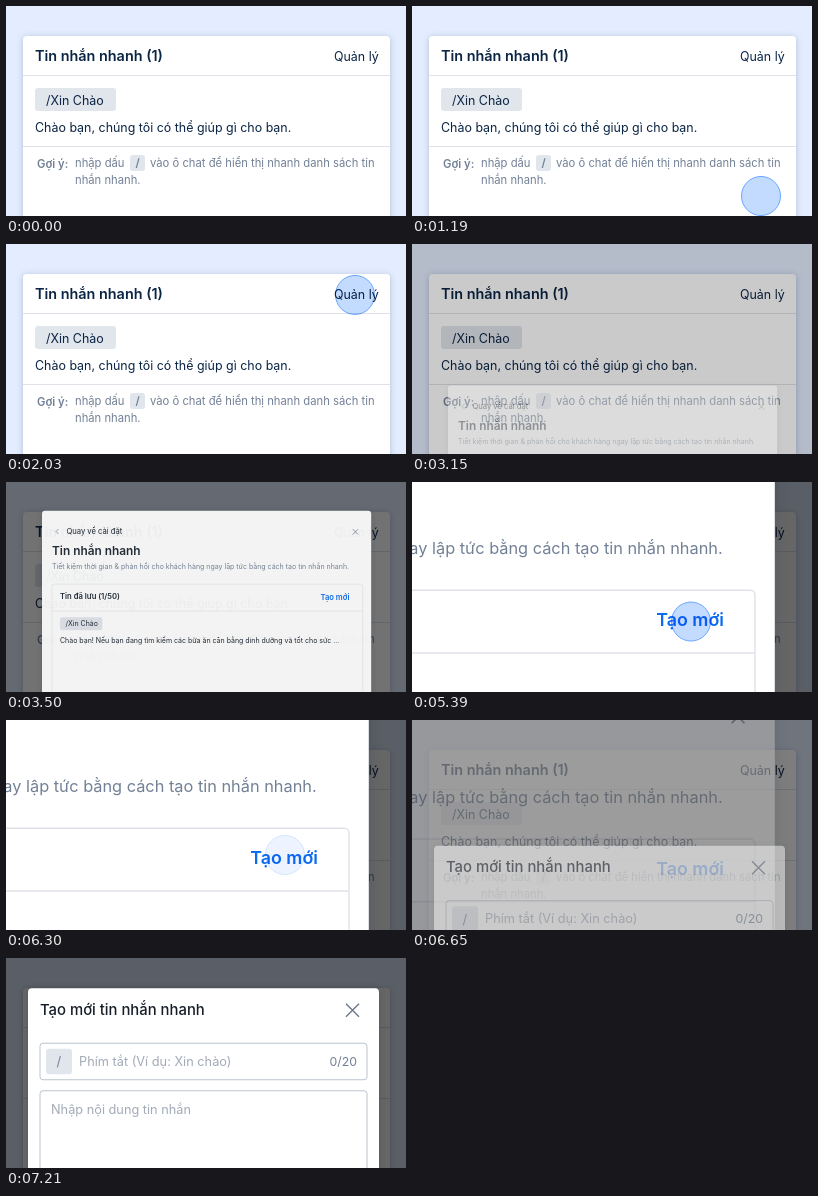
An HTML page for the animation above (8000 ms loop, 400 px wide and 210 px high).

```html
<!DOCTYPE html>
<html lang="vi">
<head>
<meta charset="utf-8">
<style>
html, body { margin: 0; width: 100%; height: 100%; overflow: hidden; }
svg { display: block; width: 400px; height: 210px; background: #e3edff; }
text { font: 12.45px Inter, sans-serif; fill: #0b2545; white-space: pre; }
.bold { font-weight: 600; }
.hint { font-size: 11.25px; fill: #728096; }
.soft { fill: #a3abb8; font-size: 12.75px; }
.small text { font-size: 7px; fill: #1d2733; }
.small .label { font-size: 7.65px; }
.small .link { fill: #0b6cf0; }
.line { stroke: #dfe2e8; fill: none; }
.icon { stroke: #6b7789; fill: none; }
.field { stroke: #bcc4cf; fill: #fff; }
.chip { fill: #e1e5ec; }
.card { fill: #fff; filter: drop-shadow(0 1px 3px #20305040); }
#touch { fill: #c2dbff; stroke: #6aa6ff; mix-blend-mode: multiply; }
</style>
</head>
<body>
<svg viewBox="0 0 400 210">
  <g>
    <rect class="card" x="17" y="30" width="367" height="200" rx="4"/>
    <path class="line" d="M17 69.5H384M17 140.5H384"/>
    <text class="bold" x="29" y="54.5" style="font-size:14.4px">Tin nhắn nhanh (1)</text>
    <text x="328" y="54.5">Quản lý</text>
    <rect class="chip" x="29" y="82" width="81" height="23" rx="3"/>
    <text x="40" y="98.7">/Xin Chào</text>
    <text x="29" y="126.2">Chào bạn, chúng tôi có thể giúp gì cho bạn.</text>
    <text class="hint bold" x="31" y="161.5">Gợi ý:</text>
    <text class="hint" x="69" y="161">nhập dấu</text>
    <rect class="chip" x="124" y="149" width="15" height="16" rx="3"/>
    <text class="hint bold" x="129.5" y="161">/</text>
    <text class="hint" x="144" y="161">vào ô chat để hiển thị nhanh danh sách tin</text>
    <text class="hint" x="69" y="178">nhắn nhanh.</text>
  </g>
  <rect id="settingsDim" width="400" height="210"/>
  <g id="settings" class="small">
    <rect class="card" x="36" y="13" width="329.2" height="240" rx="3"/>
    <path class="icon" d="M52.5 31.4l-2.5 2.5 2.5 2.5M346.7 31.4l5.5 5.5m0-5.5l-5.5 5.5" stroke-width=".7"/>
    <text class="label" x="60.4" y="36.6">Quay về cài đặt</text>
    <text class="bold" x="46" y="57.5" style="font-size:11.85px">Tin nhắn nhanh</text>
    <text x="46" y="70.9" style="fill:#728096">Tiết kiệm thời gian &amp; phản hồi cho khách hàng ngay lập tức bằng cách tạo tin nhắn nhanh.</text>
    <rect class="line" x="46" y="86.5" width="310.7" height="150" rx="2" stroke-width=".6"/>
    <path class="line" d="M46 113.4H356.7" stroke-width=".6"/>
    <text class="bold label" x="54" y="101.8">Tin đã lưu (1/50)</text>
    <text class="bold label link" x="343.4" y="101.9" text-anchor="end">Tạo mới</text>
    <rect class="chip" x="54" y="119.5" width="42.3" height="13" rx="2"/>
    <text x="59.5" y="128.7">/Xin Chào</text>
    <text x="54" y="145">Chào bạn! Nếu bạn đang tìm kiếm các bữa ăn cân bằng dinh dưỡng và tốt cho sức ...</text>
  </g>
  <rect id="createDim" width="400" height="210"/>
  <g id="create">
    <rect class="card" x="22" y="30" width="351" height="240" rx="4"/>
    <text x="34" y="56.5" style="font-size:14.85px;font-weight:500;fill:#161d29">Tạo mới tin nhắn nhanh</text>
    <path class="icon" d="M340 45.5l13 13m0-13l-13 13" stroke-width="1.4"/>
    <rect class="field" x="34" y="85" width="327" height="36.5" rx="3"/>
    <rect class="chip" x="40" y="90.5" width="26" height="25.5" rx="3"/>
    <text x="50.5" y="108" style="fill:#728096;font-size:13px">/</text>
    <text class="soft" x="73" y="107.7">Phím tắt (Ví dụ: Xin chào)</text>
    <text x="351" y="107.5" text-anchor="end" style="fill:#728096;font-size:12.3px">0/20</text>
    <rect class="field" x="34" y="132.5" width="327" height="120" rx="3"/>
    <text class="soft" x="45" y="156">Nhập nội dung tin nhắn</text>
  </g>
  <circle id="touch" r="19.5"/>
</svg>
<script>
const [settingsDim, settings, createDim, create, touch] =
  ['settingsDim', 'settings', 'createDim', 'create', 'touch'].map(id => document.getElementById(id));
const ramp = (t, start, length) => Math.min(1, Math.max(0, (t - start) / length));
const easeOut = (t, start, length, power = 3) => 1 - (1 - ramp(t, start, length)) ** power;

function place(el, opacity, x, y, scale = 1) {
  el.setAttribute('opacity', opacity);
  el.setAttribute('transform', `translate(${x} ${y}) scale(${scale})`);
}

function render() {
  const t = performance.now() % 8000;
  const open = easeOut(t, 3045, 800);
  const zoom = easeOut(t, 4368, 800);
  const swap = easeOut(t, 6499, 800);

  // Each dialog brings its own dimmed backdrop; the swap cross-fades both.
  const shown = open * (1 - swap);
  settingsDim.setAttribute('opacity', .6 * shown);
  createDim.setAttribute('opacity', .6 * swap);
  const scale = 1 + 1.334 * zoom;
  place(settings, shown, 365.2 * (1 - scale) - 2.4 * zoom,
    68.4 * (1 - scale) - 2.4 * zoom + 197 * (1 - open) + 23 * swap, scale);
  place(create, swap, 0, 180 * (1 - swap));

  const second = t > 4000;
  const press = second ? 5860 : 2430;
  const release = second ? 6140 : 2640;
  const fadeIn = second ? ramp(t, 5220, 100) : ramp(t, 950, 240);
  const size = 1 - .1 * (ramp(t, press, 100) - ramp(t, release, 100));
  const y = second ? 190 - 55 * easeOut(t, 5222, 430, 5) : 190 - 140 * easeOut(t, 1520, 630);
  place(touch, fadeIn * (1 - ramp(t, release, 230)), second ? 279 : 349, y, size);

  requestAnimationFrame(render);
}
render();
</script>
</body>
</html>
```
